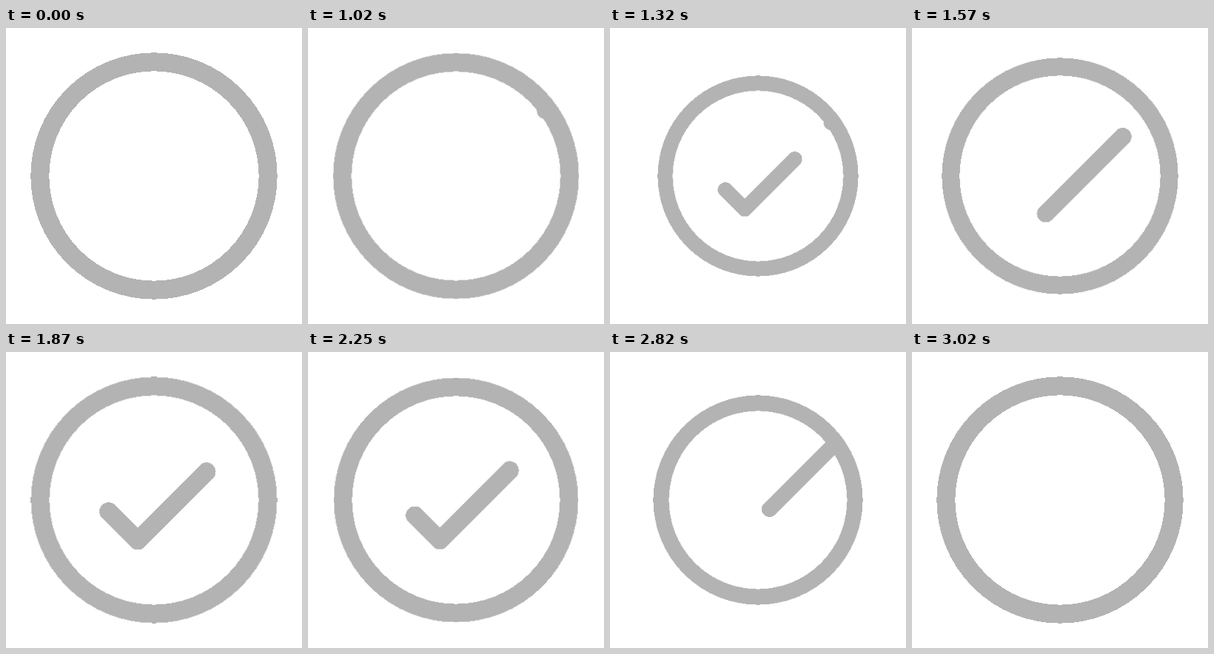
Animation of 400 by 400 pixels, one loop 3050 ms. Source, as an HTML page without scripts:

```html
<!DOCTYPE html>
<html lang="en">
<head>
<meta charset="utf-8">
<title>Check toggle</title>
<style>
  /* visible stretch of a stroke: from --tail to --head along the path */
  @property --tail { syntax: "<length>"; inherits: false; initial-value: 0px; }
  @property --head { syntax: "<length>"; inherits: false; initial-value: 0px; }

  html, body { margin: 0; width: 100%; height: 100%; overflow: hidden; background: #fff; }
  svg { display: block; width: 100vw; height: 100vh; }

  .icon {
    fill: none;
    stroke: #b3b3b3;
    stroke-width: 25px;
    stroke-linecap: round;
    stroke-linejoin: round;
    shape-rendering: crispEdges;
  }

  /* half a loop, played forwards then backwards; the delay centres the rest */
  .icon, .check {
    animation-duration: 1525ms;
    animation-delay: -2564ms;
    animation-iteration-count: infinite;
    animation-direction: alternate;
    animation-timing-function: linear;
  }
  .icon { animation-name: squeeze; }
  .check {
    stroke-dasharray: max(0px, var(--head) - var(--tail)) 999px;
    stroke-dashoffset: calc(-1 * var(--tail));
  }
  .pass { animation-name: pass-head, pass-tail; }
  .stay { animation-name: stay-head, stay-tail; }

  @keyframes squeeze {
    0% { transform: scale(1); }
    33.57% { transform: scale(1); animation-timing-function: cubic-bezier(.33, 0, .67, 1); }
    53.24% { transform: scale(.8); animation-timing-function: cubic-bezier(.15, .25, .15, 1); }
    99.14%, 100% { transform: scale(1); }
  }

  /* first stroke runs right through and leaves at the short end */
  @keyframes pass-head {
    0% { --head: 0px; }
    33.57% { --head: 0px; animation-timing-function: cubic-bezier(.33, 0, .67, 1); }
    58.16%, 100% { --head: 266.3px; }
  }
  @keyframes pass-tail {
    0% { --tail: 0px; }
    46.68% { --tail: 0px; animation-timing-function: cubic-bezier(.33, 0, .67, 1); }
    67.5% { --tail: 266.3px; }
    67.51%, 100% { --tail: 320px; }
  }

  /* second stroke follows and settles as the tick */
  @keyframes stay-head {
    0% { --head: 0px; }
    54.06% { --head: 0px; animation-timing-function: cubic-bezier(.33, .13, .67, .58); }
    61.44% { --head: 83px; animation-timing-function: cubic-bezier(.33, .39, .67, .79); }
    71.27% { --head: 204.8px; animation-timing-function: cubic-bezier(.33, .64, .67, .88); }
    84.39% { --head: 255px; animation-timing-function: cubic-bezier(.33, .58, .67, 1); }
    99.14%, 100% { --head: 266.3px; }
  }
  @keyframes stay-tail {
    0% { --tail: 0px; }
    62.26% { --tail: 0px; animation-timing-function: cubic-bezier(.33, .29, .67, .79); }
    71.27% { --tail: 51px; animation-timing-function: cubic-bezier(.33, .77, .67, .87); }
    84.39% { --tail: 72px; animation-timing-function: cubic-bezier(.33, .76, .67, 1); }
    99.14%, 100% { --tail: 76px; }
  }
</style>
</head>
<body>
<svg viewBox="-200 -200 400 400">
  <g class="icon">
    <circle r="154.17"/>
    <path class="check pass" d="M124-91.3L-22.2 55L-64.3 12.9"/>
    <path class="check stay" d="M124-91.3L-22.2 55L-64.3 12.9"/>
  </g>
</svg>
</body>
</html>
```
